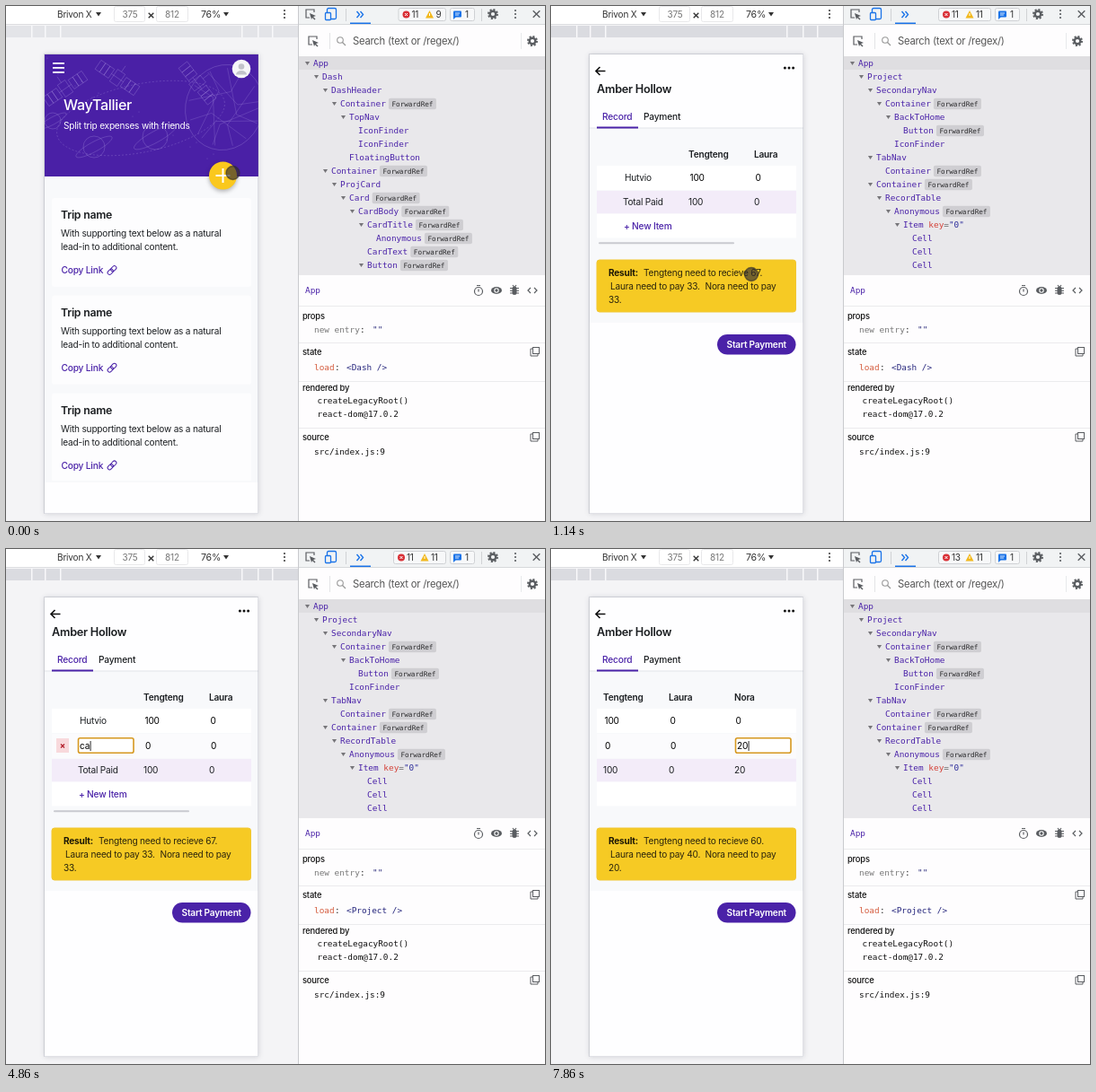
An HTML page with a canvas for the animation above (8 s loop, 600x574 px).

```html
<!DOCTYPE html>
<html lang="en">
<head>
<meta charset="utf-8">
<title>Trip expenses demo</title>
<style>
html, body { margin: 0; width: 100%; height: 100%; overflow: hidden; background: #fff; }
canvas { display: block; width: 600px; height: 574px; }
</style>
</head>
<body>
<canvas id="stage"></canvas>
<script>
const W = 600, H = 574, LOOP = 8000, FPS = 7;
const INK = '#1b1e21', PURPLE = '#4a22a8', GREY = '#6c757d', ICON = '#5a5d61', BLUE = '#1a73e8';
const UI = 'Inter, "Open Sans", sans-serif', MONO = '"DejaVu Sans Mono", "Liberation Mono", monospace';
const canvas = document.getElementById('stage');
const c = canvas.getContext('2d');
const dpr = window.devicePixelRatio || 1;
canvas.width = W * dpr;
canvas.height = H * dpr;

const HOME_TREE = '0>App|1>Dash|2>DashHeader|3>Container*|4>TopNav|5 IconFinder|5 IconFinder|4 FloatingButton|2>Container*|' +
  '3>ProjCard|4>Card*|5>CardBody*|6>CardTitle*|7 Anonymous*|6 CardText*|6>Button*|7 IconFinder';
const TRIP_TREE = '0>App|1>Project|2>SecondaryNav|3>Container*|4>BackToHome|5 Button*|4 IconFinder|2>TabNav|3 Container*|' +
  '2>Container*|3>RecordTable|4>Anonymous*|5>Item|6 Cell|6 Cell|6 Cell|6 Cell';
const PEOPLE = ['Tengteng', 'Laura', 'Nora'];

// Pointer keys: time, x, y
const PATH = [[0, 252.5, 186], [286, 252.5, 186], [857, 223, 299], [1286, 223, 299], [2143, 106, 245], [2571, 106, 245],
  [2857, 124, 219], [5143, 205, 236], [5571, 235, 207], [6286, 235, 207], [6857, 226, 219], [8000, 226, 219]];
const CLICKS = [0, 8, 17, 21, 37, 49];

const clamp = v => Math.max(0, Math.min(1, v));
const smooth = v => v * v * (3 - 2 * v);

function rect(x, y, w, h, color) {
  c.fillStyle = color;
  c.fillRect(x, y, w, h);
}
function box(x, y, w, h, r, fill, stroke, lw = 1) {
  c.beginPath();
  c.roundRect(x, y, w, h, r);
  if (fill) { c.fillStyle = fill; c.fill(); }
  if (stroke) { c.strokeStyle = stroke; c.lineWidth = lw; c.stroke(); }
}
function disc(x, y, r, fill, stroke, lw = 1) {
  c.beginPath();
  c.arc(x, y, r, 0, 7);
  if (fill) { c.fillStyle = fill; c.fill(); }
  if (stroke) { c.strokeStyle = stroke; c.lineWidth = lw; c.stroke(); }
}
// Each argument after the width is one polyline: [x, y, x, y, ...]
function lines(color, lw, ...paths) {
  c.strokeStyle = color;
  c.lineWidth = lw;
  c.beginPath();
  for (const p of paths)
    for (let i = 0; i < p.length; i += 2) c[i ? 'lineTo' : 'moveTo'](p[i], p[i + 1]);
  c.stroke();
}
function shape(color, ...p) {
  c.fillStyle = color;
  c.beginPath();
  for (let i = 0; i < p.length; i += 2) c.lineTo(p[i], p[i + 1]);
  c.fill();
}
function text(s, x, y, color = INK, size = 10.1, weight = 400, align = 'left') {
  c.font = `${weight} ${size}px ${UI}`;
  c.letterSpacing = `${-0.02 * size}px`;
  c.textAlign = align;
  c.fillStyle = color;
  c.fillText(s, x, y + size * 0.36);
}
function mono(s, x, y, color, size = 9.4) {
  c.font = `${size}px ${MONO}`;
  c.letterSpacing = '0px';
  c.textAlign = 'left';
  c.fillStyle = color;
  c.fillText(s, x, y + size * 0.35);
}
function clipped(x, y, w, h, draw) {
  c.save();
  c.beginPath();
  c.rect(x, y, w, h);
  c.clip();
  draw();
  c.restore();
}
function at(x, y, angle, draw) {
  c.save();
  c.translate(x, y);
  c.rotate(angle);
  draw();
  c.restore();
}
const pill = (x, y, w, h, s, color) => {
  box(x, y, w, h, h / 2, color);
  text(s, x + w / 2, y + h / 2, '#fff', 10.1, 600, 'center');
};
const cross = (x, y, r, color, lw) => lines(color, lw, [x - r, y - r, x + r, y + r], [x - r, y + r, x + r, y - r]);
const caretDown = (x, y, r, color) => shape(color, x - r, y - r * 0.7, x + r, y - r * 0.7, x, y + r * 0.8);
const dots = (x, y, dx, dy, r, color) => [-1, 0, 1].forEach(i => disc(x + i * dx, y + i * dy, r, color));

function gear(x, y) {
  c.setLineDash([2, 1.9]);
  disc(x, y, 5, null, ICON, 2);
  c.setLineDash([]);
  disc(x, y, 3.3, null, ICON, 2.4);
}
function inspectIcon(x, y) {
  lines(ICON, 1.2, [x - 1, y + 4, x - 5, y + 4, x - 5, y - 5, x + 4, y - 5, x + 4, y - 2]);
  shape(ICON, x - 1, y - 1, x + 6, y + 2, x + 3, y + 3, x + 5.5, y + 5.5, x + 4.5, y + 6.5, x + 2, y + 4, x + 1, y + 6);
}
function copyIcon(x, y) {
  lines(ICON, 1, [x - 3, y - 3, x - 5, y - 3, x - 5, y + 5, x + 3, y + 5, x + 3, y + 3]);
  c.strokeRect(x - 2.5, y - 4.5, 7, 7);
}
function linkIcon(x, y) {
  at(x, y, -Math.PI / 4, () => {
    box(-6, -2.2, 7, 4.4, 2.2, null, PURPLE);
    box(-1, -2.2, 7, 4.4, 2.2, null, PURPLE);
  });
}

function deviceBar(home) {
  rect(0, 0, 325, H, '#f4f4f6');
  rect(0, 0, 325, 21, '#fff');
  text('Brivon X', 57, 9, '#333');
  caretDown(103, 9, 3, '#333');
  box(120.5, 0.5, 34, 17, 2, '#fff', '#e8e8ea');
  text('375', 138, 9, '#777', 10, 400, 'center');
  cross(161.5, 10.5, 2.8, '#333', 1.4);
  box(167.5, 0.5, 35, 17, 2, '#fff', '#e8e8ea');
  text('812', 185, 9, '#777', 10, 400, 'center');
  text('76%', 217, 9, '#333', 10.6);
  caretDown(245, 9, 3, '#333');
  dots(310, 9, 0, 4, 1.1, '#444');
  rect(0, 20, 325, 1, '#dcdde0');
  rect(0, 22, 325, 13, home ? '#e3e4e8' : '#dadbe0');
  for (const x of [28, 43, 60, 262, 280, 296]) rect(x, 22, 1.5, 13, '#f8f8fa');
}

function tree(rows) {
  rect(326, 56, 274, 244, '#e9e8eb');
  rect(326, 56, 274, 15, '#dfdee1');
  rows.split('|').forEach((row, i) => {
    const x = 342 + 10 * row[0], y = 63.3 + 15 * i, name = row.slice(2).replace('*', '');
    if (row[1] === '>') caretDown(x - 6.5, y + 0.5, 2.6, '#77767a');
    mono(name, x, y, PURPLE);
    const end = x + name.length * 5.66;
    if (row.endsWith('*')) {
      box(end + 3, y - 5.5, 53, 12.5, 2, '#cfced2');
      mono('ForwardRef', end + 6.5, y + 1, '#2a2a2c', 7.65);
    }
    if (name === 'Item') {
      mono('key', end + 5.7, y, '#d4433a');
      mono('=', end + 22.6, y, '#666');
      mono('"0"', end + 28.3, y, '#2a2a9a');
    }
  });
}

// The badge grows to the left when the warning count gets a second digit
function issueBadge(errors, warnings) {
  const x = warnings < 10 ? 437 : 431.5;
  box(x, 2.5, 489.5 - x, 14, 2, '#f7f8f9', '#cfd1d4');
  disc(x + 8.5, 9.5, 4, '#d93036');
  cross(x + 8.5, 9.5, 1.5, '#fff', 1);
  text(errors, x + 14.5, 9.5, '#333', 10);
  shape('#f2b81c', x + 34.5, 5, x + 39, 13.5, x + 30, 13.5);
  rect(x + 34, 8, 1, 3, '#fff');
  text(warnings, x + 41.5, 9.5, '#333', 10);
}

function devtools(rows, errors, warnings, page) {
  rect(326, 0, 274, H, '#fefdfe');
  rect(325, 0, 1, H, '#c9cacd');
  rect(326, 0, 274, 20, '#f1f3f4');
  inspectIcon(339, 9);
  box(357.5, 2.5, 10, 12, 1.5, null, BLUE, 1.3);
  box(355.5, 7.5, 6, 8, 1, '#f1f3f4', BLUE, 1.3);
  rect(378, 3, 1, 14, '#d0d2d5');
  lines(BLUE, 1.4, [390.5, 6, 393.5, 9.5, 390.5, 13], [394.5, 6, 397.5, 9.5, 394.5, 13]);
  rect(383, 18.5, 23, 1.5, BLUE);
  issueBadge(errors, warnings);
  box(494.5, 2.5, 27, 14, 2, '#f7f8f9', '#cfd1d4');
  box(498, 5.5, 9, 7, 1, BLUE);
  shape(BLUE, 498, 11, 502, 11, 498, 15);
  lines('#fff', 0.8, [500, 8, 505, 8], [500, 10, 504, 10]);
  text('1', 511, 9.5, '#333', 10);
  rect(529, 3, 1, 14, '#d0d2d5');
  gear(542, 9);
  dots(567, 9, 0, 4, 1.1, ICON);
  cross(590.5, 9, 3.8, ICON, 1.4);
  rect(326, 20, 274, 1, '#d6d8db');

  inspectIcon(342, 39);
  rect(360, 30, 1, 18, '#e3e4e6');
  disc(372, 38, 3.3, null, '#999', 1.1);
  lines('#999', 1.2, [374.5, 40.5, 378, 44]);
  text('Search (text or /regex/)', 386, 39, '#555', 11.25);
  rect(573, 30, 1, 18, '#e8e9eb');
  gear(586, 39);
  clipped(326, 56, 274, 244, () => tree(rows));

  mono('App', 333, 317, PURPLE);
  disc(526, 318, 4.5, null, ICON, 1.2);
  lines(ICON, 1.2, [524, 311.5, 528, 311.5], [526, 315.5, 526, 318.5]);
  c.beginPath();
  c.ellipse(546, 317, 6, 3.9, 0, 0, 7);
  c.fillStyle = ICON;
  c.fill();
  disc(546, 317, 2.2, ICON, '#fff', 1.1);
  box(563.5, 312.5, 5, 9.5, 2.5, ICON);
  lines(ICON, 1.1, [561, 314.5, 571, 314.5], [561, 317.2, 571, 317.2], [561, 320, 571, 320], [564, 311, 565.5, 313], [568, 311, 566.5, 313]);
  lines(ICON, 1.2, [584, 314, 581, 317, 584, 320], [588, 314, 591, 317, 588, 320]);
  for (const y of [334, 375, 418, 470]) rect(326, y, 274, 1, '#ebebed');

  [['props', 346], ['state', 386], ['rendered by', 425.5], ['source', 480.5]].forEach(([s, y]) => text(s, 330, y, '#111', 9.4, 500));
  mono('new entry', 343, 360.5, '#777');
  mono(':', 394, 360.5, '#222');
  mono('""', 408, 360.5, '#2a2a7a');
  copyIcon(589, 385);
  mono('load', 343, 402.5, '#d45a3c');
  mono(':', 366, 402.5, '#222');
  mono(`<${page} />`, 379, 402.5, '#25257c');
  mono('createLegacyRoot()', 346.5, 440, '#111');
  mono('react-dom@17.0.2', 346.5, 455, '#111');
  copyIcon(589, 480);
  mono('src/index.js:9', 343, 497, '#111');
}

function spaceArt() {
  const line = 'rgba(205,190,245,.3)';
  const oval = (x, y, rx, ry, a = 0) => {
    c.beginPath();
    c.ellipse(x, y, rx, ry, a, 0, 7);
    c.strokeStyle = line;
    c.lineWidth = 0.7;
    c.stroke();
  };
  // globe with a net of triangles
  oval(243, 113, 43, 48, 0.3);
  for (let i = 0; i < 9; i++) {
    const a = i * 2.4, b = a + 1.9;
    lines(line, 0.6, [243 + 40 * Math.cos(a), 113 + 44 * Math.sin(a), 243 + 15 * Math.cos(b), 113 + 20 * Math.sin(b), 243 + 40 * Math.cos(b), 113 + 44 * Math.sin(b)]);
  }
  // ringed planets
  for (const [x, y, r] of [[98, 157, 12], [166, 146, 14], [52, 128, 9]]) {
    oval(x, y, r, r);
    oval(x, y, r * 1.9, r * 0.45, -0.5);
  }
  // satellites
  for (const [x, y, a] of [[124, 80, 0.6], [66, 92, -0.6], [213, 86, 0.9]]) {
    at(x, y, a, () => {
      c.strokeStyle = line;
      c.lineWidth = 0.7;
      c.strokeRect(-5, -8, 10, 16);
      for (const s of [-26, 8]) for (let i = 0; i < 3; i++) c.strokeRect(s + i * 6, -6, 6, 12);
      lines(line, 0.7, [0, -8, 0, -16], [-8, 0, 8, 0]);
    });
  }
  c.setLineDash([2, 2]);
  oval(150, 125, 95, 38, -0.2);
  c.setLineDash([]);
  for (let i = 0; i < 24; i++) disc(46 + (i * 83) % 230, 58 + (i * 47) % 128, 0.6, line);
}

function homePage() {
  rect(43, 190, 238, 341, '#f8f9fb');
  clipped(43, 54, 238, 136, () => {
    rect(43, 54, 238, 136, '#4a20a6');
    spaceArt();
  });
  for (const y of [64, 69, 74]) rect(52, y - 1, 13, 1.8, '#fff');
  disc(262, 70, 10.3, '#f6f6f8');
  disc(262, 67.5, 3.3, '#c2c3ca');
  c.beginPath();
  c.ellipse(262, 76.5, 6, 4.5, 0, Math.PI, 0);
  c.fill();
  text('WayTallier', 64, 110, '#fff', 16.1, 500);
  text('Split trip expenses with friends', 64, 133, '#fff');
  c.save();
  c.shadowColor = 'rgba(0,0,0,.3)';
  c.shadowBlur = 5;
  c.shadowOffsetY = 2;
  disc(241.5, 189, 15.5, '#fac81e');
  c.restore();
  lines('#fff', 2, [233.5, 189, 249.5, 189], [241.5, 181, 241.5, 197]);
  clipped(43, 190, 238, 339, () => {
    for (let y = 214; y < 450; y += 108.7) {
      box(51, y, 222, 99, 3, '#fdfdfe');
      text('Trip name', 61, y + 19, INK, 12.3, 600);
      text('With supporting text below as a natural', 61, y + 39.5);
      text('lead-in to additional content.', 61, y + 54.5);
      text('Copy Link', 61.5, y + 80.5, PURPLE, 10.2, 500);
      linkIcon(118, y + 80.5);
    }
  });
}

function tripModal(p) {
  rect(43, 54, 238, 512, `rgba(0,0,0,${0.5 * p})`);
  c.save();
  c.globalAlpha = p;
  c.translate(0, -30 * (1 - p));
  box(49, 60, 225, 258, 3, '#fff');
  text('New Trip', 59, 80, INK, 12.7, 600);
  cross(259, 80, 4.8, '#444', 1.3);
  rect(49, 99, 225, 1, '#e1e4e8');
  text('Trip Name', 59, 117, INK, 10.1, 500);
  box(59.5, 128.5, 204, 23, 2.5, '#fff', '#ced4da');
  text('Name your Trip', 67, 140, GREY);
  text('Invite Friends', 59, 173, INK, 10.1, 500);
  for (const y of [184.5, 218.5]) {
    box(59.5, y, 204, 23, 2.5, '#fff', '#ced4da');
    text('any@mailbox.test', 67, y + 11.5, GREY);
    box(219.5, y, 44, 23, [0, 2.5, 2.5, 0], '#fff', '#777e85');
    text('Select', 241.5, y + 11.5, GREY, 10.1, 400, 'center');
  }
  text('+ Add Friend', 60, 261, PURPLE, 10.2, 500);
  pill(133.5, 284.5, 52.5, 23, 'Discard', '#6b6d72');
  pill(192, 284.5, 72.5, 23, 'Create Trip', PURPLE);
  c.restore();
}

function editCell(x, y, s) {
  box(x, y - 8.3, 61.5, 16.6, 2, '#fff', '#d6981f', 1.6);
  text(s, x + 1.5, y, '#000');
  rect(x + 2 + c.measureText(s).width, y - 5, 0.9, 11, '#111');
}

function table(s) {
  const cols = (values, x, y, weight, color) => values.forEach((v, i) => text(v, x + 73 * i, y, color, 10.1, weight));
  const dy = s.added ? 28 : 0;
  rect(51, 178, 222, 27, '#fff');
  if (s.added) rect(51, 206, 222, 27, '#fbfbfd');
  rect(51, 206 + dy, 222, 25.5, '#f3ecf9');
  rect(51, 231.5 + dy, 222, 27, '#fff');
  clipped(51, 140, 222, 160, () => {
    c.translate(-s.scroll * 95, 0);
    cols(PEOPLE, 153, 165, 600);
    text('Hutvio', 82, 191);
    cols(['100', '0', '0'], 154.5, 191, 400, '#000');
    if (s.added) {
      if (s.editItem) {
        rect(56, 211, 14, 16, '#f8d9dc');
        cross(63, 219.5, 2, '#b3202c', 1.3);
        editCell(80.5, 219, s.item);
      } else text(s.item, 82, 219, '#000');
      cols(['0', '0', s.editCost ? '' : s.cost], 155, 219, 400, '#000');
      if (s.editCost) editCell(300.5, 219, s.cost);
    }
    text('Total Paid', 80, 218.5 + dy);
    cols(['100', '0', String(+s.cost)], 153, 218.5 + dy);
    text('+ New Item', 81, 245 + dy, PURPLE, 10.2, 500);
    if (s.focus) box(79, 264, 56.5, 17.5, 1, null, '#b3c9f3', 2);
  });
  c.globalAlpha = s.bar;
  box(53 + 66 * s.scroll, 263.3 + dy, 151, 2, 1, '#c9cad0');
  c.globalAlpha = 1;
}

function tripPage(s) {
  const dy = s.added ? 28 : 0;
  lines('#111', 1.6, [60.5, 72.5, 50, 72.5], [54.5, 68, 50, 72.5, 54.5, 77]);
  dots(265, 69, 4.6, 0, 1.5, '#111');
  text('Amber Hollow', 51, 92, INK, 12.7, 600);
  text('Record', 57, 123, PURPLE, 10.2, 500);
  text('Payment', 103, 123, INK, 10.2, 500);
  rect(43, 136, 238, 217 + dy, '#f8f9fb');
  rect(43, 135.5, 238, 1, '#e4e6ea');
  rect(51, 134.5, 46, 2, PURPLE);
  table(s);

  const share = (100 + +s.cost) / 3, [a, b, d] = PEOPLE;
  const ink = '#2b240c', y = 297 + dy;
  box(51, 283 + dy, 221.5, 58, 3, '#f6ca24', '#f1c733');
  text('Result:', 64, y, '#1c1706', 10.1, 700);
  text(`${a} need to recieve ${Math.round(100 - share)}.`, 103, y, ink);
  text(`${b} need to pay ${Math.round(share)}.`, 66, y + 15.2, ink);
  text(`${d} need to pay`, 171.5, y + 15.2, ink);
  text(`${Math.round(share - s.cost)}.`, 64, y + 30.4, ink);
  pill(185, 366 + dy, 87.5, 22.5, 'Start Payment', PURPLE);
}

function pointer(t, step) {
  if ((step > 24 && step < 36) || step > 51) return;
  const i = PATH.findIndex(k => k[0] > t);
  const [t0, x0, y0] = PATH[i - 1], [t1, x1, y1] = PATH[i];
  const p = smooth((t - t0) / (t1 - t0));
  const x = x0 + (x1 - x0) * p, y = y0 + (y1 - y0) * p;
  if (CLICKS.includes(step)) disc(x, y, 7.5, 'rgba(50,46,50,.66)', 'rgba(50,46,44,.6)', 1.4);
  else disc(x, y, 7.6, 'rgba(88,86,92,.76)');
}

function itemText(step) {
  if (step < 25) return 'new item';
  return step < 33 ? 'new item'.slice(0, 32 - step) : 'car'.slice(0, step - 32);
}

function render(now) {
  const step = Math.floor((now % LOOP + 5) * FPS / 1000) % (LOOP * FPS / 1000);
  const t = step * 1000 / FPS, home = step < 8;
  const s = {
    added: step >= 18,
    focus: step >= 18 && step < 21,
    item: itemText(step),
    editItem: step >= 22 && step < 37,
    editCost: step >= 49,
    cost: step < 52 ? '0' : '20'.slice(0, step - 52),
    scroll: clamp((step - 40) / 2),
    bar: 1 - clamp((step - 43) / 4)
  };
  c.setTransform(dpr, 0, 0, dpr, 0, 0);
  deviceBar(home);
  c.save();
  c.shadowColor = 'rgba(60,64,80,.2)';
  c.shadowBlur = 6;
  rect(43, 54, 238, 512, '#fefeff');
  c.restore();
  if (home) {
    homePage();
    if (step) tripModal(clamp(step / 2));
  } else tripPage(s);
  c.strokeStyle = 'rgba(120,124,140,.22)';
  c.lineWidth = 1;
  c.strokeRect(42.5, 53.5, 238, 512);
  devtools(home ? HOME_TREE : TRIP_TREE, 11 + Math.max(0, Math.min(2, step - 52)), step < 2 ? 9 : home ? 10 : 11, step < 9 ? 'Dash' : 'Project');
  pointer(t, step);
}

const start = performance.now();
function tick() {
  render(performance.now() - start);
  requestAnimationFrame(tick);
}
tick();
</script>
</body>
</html>
```
